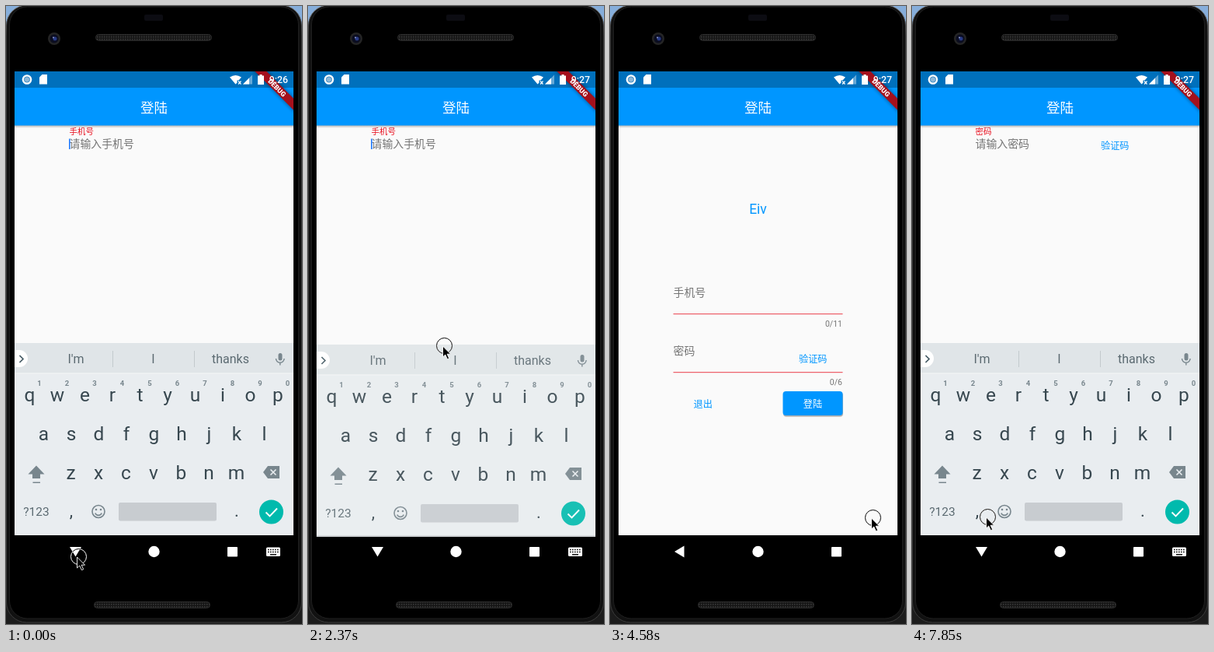
Write an HTML page that moves like this. It is 381 px wide and 794 px high and loops after 8000 ms.

```html
<!DOCTYPE html>
<html lang="zh-CN">
<head>
<meta charset="utf-8">
<style>
html, body { margin: 0; width: 100%; height: 100%; overflow: hidden; background: #000 }
svg { display: block; width: 381px; height: 794px; font-family: Roboto, "Noto Sans CJK SC", "Noto Sans CJK", sans-serif }
.mid { text-anchor: middle }
.end { text-anchor: end }
.grey { fill: #757575 }
.blue { fill: #0096ff }
.red { fill: #e8101f }
#ring { mix-blend-mode: difference }
</style>
</head>
<body>
<svg viewBox="0 0 381 794">
  <defs>
    <clipPath id="view"><rect id="viewRect" x="11" y="154" width="359" height="526"/></clipPath>
    <clipPath id="screen"><rect x="11" y="84" width="359" height="598"/></clipPath>
    <filter id="soft" x="-20%" y="-100%" width="140%" height="300%"><feGaussianBlur stdDeviation="2.500"/></filter>
    <linearGradient id="shade" x2="0" y2="1">
      <stop stop-color="#000" stop-opacity=".3"/><stop offset="1" stop-color="#000" stop-opacity="0"/>
    </linearGradient>
    <linearGradient id="rim" x2="0" y2="1">
      <stop stop-color="#777"/><stop offset=".05" stop-color="#3a3a3a"/><stop offset="1" stop-color="#3a3a3a"/>
    </linearGradient>
    <pattern id="mesh" width="3" height="3" patternUnits="userSpaceOnUse">
      <rect width="3" height="3" fill="#151515"/><rect width="1.500" height="1.500" fill="#3c3c3c"/>
    </pattern>
  </defs>

  <!-- phone body -->
  <rect width="381" height="794" fill="#86aedb"/>
  <rect y="400" width="381" height="394" fill="#1c1c1c"/>
  <rect x=".5" y="-1" width="380" height="793" rx="26" fill="#111" stroke="url(#rim)"/>
  <rect x="4.500" y="1" width="372" height="786" rx="23" fill="#000" stroke="#202020"/>
  <rect x="178" y="11" width="24" height="8" rx="2" fill="#0c0c12"/>
  <rect x="115.500" y="36.500" width="149" height="8" rx="4" fill="url(#mesh)" stroke="#2c2c2c"/>
  <rect x="113.500" y="765.500" width="149" height="8" rx="4" fill="url(#mesh)" stroke="#2c2c2c"/>
  <circle cx="62" cy="42" r="8" fill="#252525"/>
  <circle cx="62" cy="42" r="5.500" fill="#0b0d20"/>
  <circle cx="63" cy="42" r="2.500" fill="#283a85"/>
  <circle cx="61" cy="40.500" r="1" fill="#8f9bd0"/>

  <rect x="11" y="84" width="359" height="596" fill="#fafafa"/>

  <g clip-path="url(#view)"><g id="form">
    <text class="mid blue" x="190.500" y="327.500" font-size="17.500">Eiv</text>
    <g id="fields"></g>
    <text class="blue" x="243" y="518.500" font-size="12.200">验证码</text>
    <text class="blue" x="107.500" y="576.500" font-size="12.200">退出</text>
    <rect x="223" y="558" width="77" height="31" rx="4" opacity=".12"/>
    <rect x="223" y="557" width="77" height="31.500" rx="4" opacity=".2"/>
    <rect class="blue" x="222.500" y="556" width="77" height="31" rx="4"/>
    <text class="mid" x="261" y="576.500" font-size="12.200" fill="#fff">登陆</text>
  </g></g>

  <!-- app bar and status bar -->
  <rect x="11" y="153" width="359" height="4" fill="url(#shade)"/>
  <rect class="blue" x="11" y="105" width="359" height="48.500"/>
  <rect x="11" y="84" width="359" height="21" fill="#0070bc"/>
  <text class="mid" x="190.500" y="136.500" font-size="17.500" fill="#fff">登陆</text>
  <g clip-path="url(#screen)"><g transform="translate(370 84) rotate(45)">
    <rect x="-40" y="24.500" width="80" height="10.500" opacity=".5" filter="url(#soft)"/>
    <rect x="-40" y="24.500" width="80" height="10.500" fill="#a5101c"/>
    <text class="mid" y="32.900" font-size="8.800" font-weight="900" fill="#fff">DEBUG</text>
  </g></g>
  <g fill="#fff">
    <circle cx="27" cy="94.500" r="6.300"/>
    <circle cx="27" cy="94.500" r="3.600" fill="#8fb9d8" stroke="#3f8dc4"/>
    <path d="M46.500 88H53v12.500H43V91.500z"/>
    <path d="M288 91.500q7.500 -5 15 0L299.500 95.500h-2v3l-2 2z"/>
    <path d="M299 96.500l3.500 4m0 -4l-3.500 4" stroke="#fff" stroke-width="1.200"/>
    <path d="M317 88.500V100.500H305z" opacity=".4"/><path d="M313 92.500v8h-8z"/>
    <path d="M324 89.500h2.500v-1.500h3v1.500h2.500v11.500h-8z"/>
    <text id="clock" class="end" x="363" y="99" font-size="12.300" font-weight="500"></text>
  </g>

  <rect x="11" y="680" width="359" height="42"/>

  <g clip-path="url(#screen)"><g id="kb">
    <rect x="11" y="433" width="359" height="247" fill="#e9edf0"/>
    <rect x="11" y="433" width="359" height="38.500" fill="#e0e5e8"/>
    <path d="M11 472h359" stroke="#f3f6f7"/>
    <path d="M137.500 443v21m105 -21v21" stroke="#c3cacd"/>
    <path d="M11 442h6a11 11 0 0 1 0 22h-6z" fill="#fff"/>
    <path d="M17.500 449l4.500 4.500l-4.500 4.500" fill="none" stroke="#455a64" stroke-width="1.700"/>
    <g fill="#78868d">
      <rect x="350.500" y="446" width="5" height="9.500" rx="2.500"/>
      <path d="M347.500 453a5.300 5.300 0 0 0 10.600 0M352.800 458v3.500" fill="none" stroke="#78868d" stroke-width="1.400"/>
      <path d="M39 590.500L49.500 601.500H44V607H34V601.500H28.500zM34.500 611.500h9.500v1.500h-9.500z"/>
      <path d="M337 591h15v16h-15l-6 -8z"/>
      <path d="M340.500 595.500l7 7m0 -7l-7 7" stroke="#e9edf0" stroke-width="1.600"/>
      <circle cx="116" cy="647" r="1.300"/><circle cx="122" cy="647" r="1.300"/>
      <g fill="none" stroke="#78868d" stroke-width="1.600">
        <circle cx="119" cy="649.500" r="8"/>
        <path d="M114.800 651.500a4.500 4.500 0 0 0 8.400 0"/>
      </g>
    </g>
    <rect x="145" y="638" width="126" height="23.500" rx="2" fill="#c8ccd0"/>
    <circle cx="341.500" cy="650" r="15.500" fill="#00baad"/>
    <path d="M334.500 650.500l5 5l9.500 -10" fill="none" stroke="#fff" stroke-width="1.900"/>
    <g id="keys" class="mid"></g>
  </g></g>

  <!-- navigation buttons -->
  <g fill="#fff">
    <path id="back" d="M83 701L95.500 693.500V708.500z"/>
    <circle cx="190.500" cy="701" r="7.200"/>
    <rect x="285" y="695" width="13" height="12.500" rx=".8"/>
    <g id="kbIcon">
      <rect x="335" y="695.500" width="18" height="11.500" rx="1.500"/>
      <path d="M337 698.500h14M337 701.500h14" stroke="#000" stroke-width="1.500" stroke-dasharray="1.600 1.400"/>
      <path d="M340 704.800h8" stroke="#000" stroke-width="1.400"/>
    </g>
  </g>

  <circle id="ring" cx=".5" cy=".5" r="10" fill="none" stroke="#fff"/>
  <path id="arrow" d="M-1.500 1v14l3.200 -3l2.700 5.700l2.300 -1l-2.600 -5.500h4.500z" stroke="#fff" stroke-width=".9"/>
</svg>
<script>
const $ = id => document.getElementById(id);
const text = (x, y, size, fill, s, more = '') =>
  `<text x="${x}" y="${y}" font-size="${size}" fill="${fill}" ${more}>${s}</text>`;

// keyboard captions
const PITCH = 35.5, INK = '#37474f', SOFT = '#5b6a71';
let keys = '';
[['qwertyuiop', 30.5, 508], ['asdfghjkl', 48.5, 558], ['zxcvbnm', 83.5, 608]].forEach(([row, x, y], r) =>
  [...row].forEach((c, i) => {
    keys += text(x + i * PITCH, y, 24.5, INK, c);
    if (!r) keys += text(x + i * PITCH + 12.5, 488, 9.5, '#78868d', (i + 1) % 10, 'font-weight="700"');
  }));
["I'm", 'I', 'thanks'].forEach((s, i) => keys += text(90 + i * 99.5, 459, 16, SOFT, s));
keys += text(39, 655, 15.5, SOFT, '?123') + text(84, 656, 22, INK, ',') + text(297, 656, 22, INK, '.');
$('keys').innerHTML = keys;

// a text field; y is the baseline of its hint
function field(name, y, max, focused, caret) {
  const label = focused
    ? `<text class="red" x="81.500" y="${y - 17.5}" font-size="10.500">${name}</text>
       <text class="grey" x="81.500" y="${y}" font-size="13.900">请输入${name}</text>`
    : `<text class="grey" x="81.500" y="${y - 8}" font-size="13.900">${name}</text>`;
  return label
    + (focused && caret ? `<rect x="81" y="${y - 11.5}" width="1.700" height="13.500" fill="#2a80ff"/>` : '')
    + `<rect class="red" x="81.500" y="${y + (focused ? 14 : 14.2)}" width="218" height="${focused ? 1.8 : 1}" opacity="${focused ? 1 : .8}"/>`
    + `<text class="grey end" x="299" y="${y + 31}" font-size="10.500">0/${max}</text>`;
}

const STEP = 8000 / 54;
// step, bottom inset, keyboard offset, keyboard opacity, turn of the back arrow
const screens = [
  [0, 247, 0, 1, 0], [1, 150, 60, .4, 30], [2, 45, 247, 0, 50], [3, 15, 247, 0, 65], [4, 6, 247, 0, 75], [5, 0, 247, 0, 90],
  [15, 180, 40, .5, 0], [16, 247, 2, .9, 0], [17, 247, 0, 1, 0],
  [30, 150, 60, .4, 60], [31, 61, 247, 0, 90], [32, 17, 247, 0, 90], [33, 9, 247, 0, 90], [35, 0, 247, 0, 90],
  [41, 180, 40, .5, 0], [42, 247, 2, .9, 0], [43, 247, 0, 1, 0]];
const pointer = [
  [0, 93, 707], [4, 93, 707], [8, 173, 439], [10, 173, 439], [12, 175, 436], [20, 175, 436], [21, 115, 278],
  [23, 223, 633], [24, 223, 633], [28, 338, 657], [35, 338, 657], [38, 179, 490], [45, 179, 490],
  [48, 276, 420], [50, 276, 420], [53, 97, 656]];
const blinks = [5, 8, 11, 14, 18, 21, 25, 28, 44, 48, 51];

function pointerAt(n) {
  const i = Math.max(1, pointer.findIndex(p => p[0] >= n));
  const [a, ax, ay] = pointer[i - 1], [b, bx, by] = pointer[i];
  const k = (n - a) / (b - a);
  return [ax + (bx - ax) * k, ay + (by - ay) * k];
}

function draw(n) {
  const [, inset, kbY, alpha, turn] = screens.filter(s => s[0] <= n).pop();
  const phone = n < 29, code = n >= 40;
  const caret = blinks.filter(b => b <= n).length % 2 === 0;

  // the form is centred while it fits, otherwise it scrolls to the caret
  const height = 526 - 2 * inset;
  const caretEnd = phone ? 199 : code ? 274 : 0;
  const shift = height >= 341 ? -inset : -93 - Math.max(0, caretEnd - height);
  $('viewRect').setAttribute('height', height);
  $('form').setAttribute('transform', `translate(0 ${shift})`);
  $('fields').innerHTML = field('手机号', 442, 11, phone, caret) + field('密码', 517, 6, code, caret);

  $('kb').setAttribute('transform', `translate(0 ${kbY})`);
  $('kb').setAttribute('opacity', alpha);
  $('kbIcon').setAttribute('opacity', alpha ? 1 : 0);
  $('back').setAttribute('transform', `rotate(${turn - 90} 89.5 701)`);
  $('clock').textContent = n < 2 ? '9:26' : '9:27';
  for (const id of ['ring', 'arrow']) $(id).setAttribute('transform', `translate(${pointerAt(n)})`);
}

let start, last = -1;
function tick(now) {
  start ??= now;
  const n = Math.min(53, Math.floor(((now - start) % 8000 + 14) / STEP));
  if (n !== last) draw(last = n);
  requestAnimationFrame(tick);
}
draw(0);
requestAnimationFrame(tick);
</script>
</body>
</html>
```
